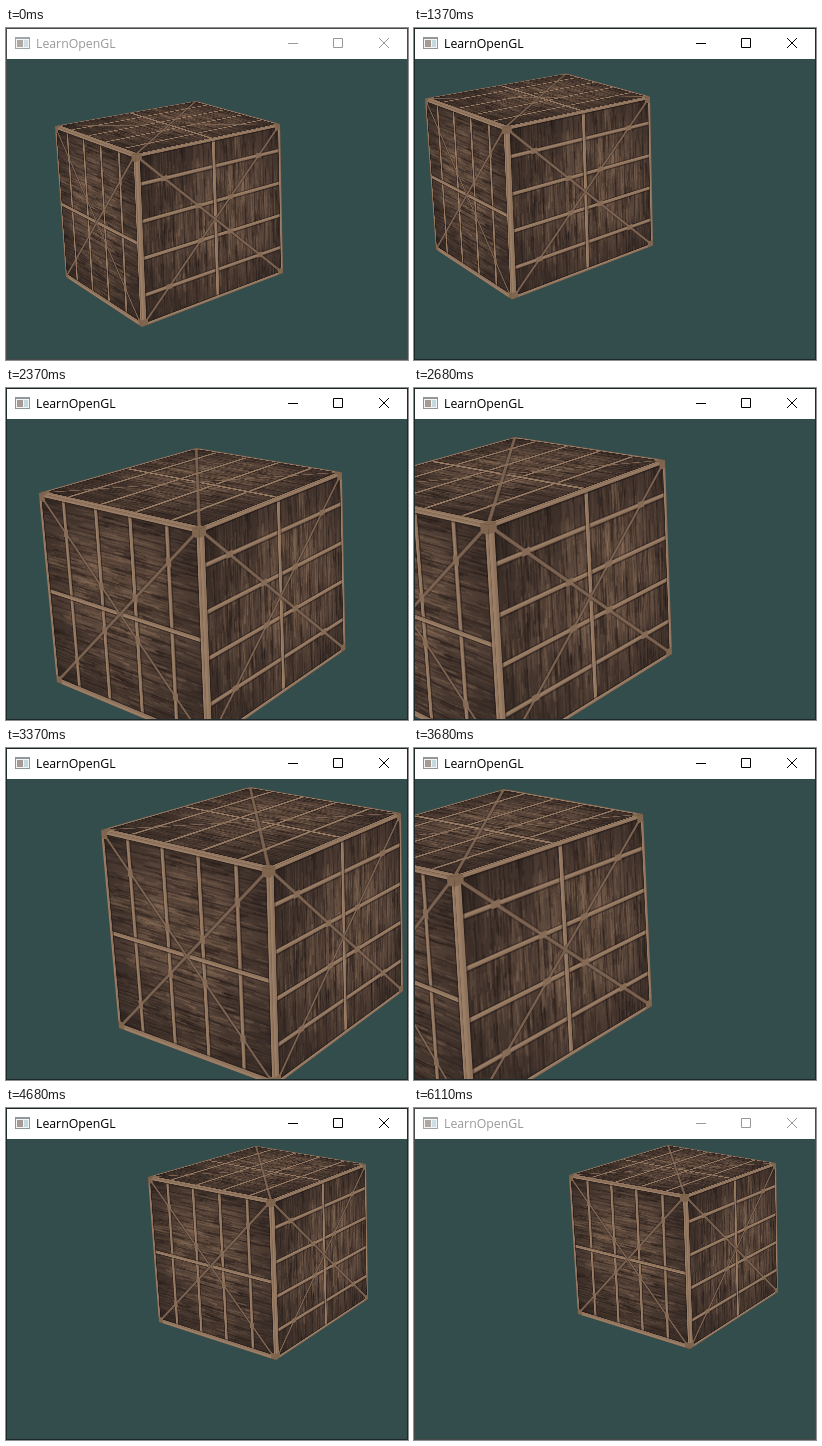
Write an HTML page with a canvas that moves like this. It is 402x332 px and loops after 6.17 s.

```html
<!DOCTYPE html>
<html lang="en">
<head>
<meta charset="utf-8">
<title>Textured cube</title>
<style>
  html, body { margin: 0; width: 100%; height: 100%; overflow: hidden; background: #fff; }
  #window { position: absolute; left: 0; top: 0; width: 402px; height: 332px; overflow: hidden; background: #fff; }
  #bar, #outline { position: absolute; left: 0; top: 0; }
  #view { position: absolute; left: 1px; top: 31px; width: 400px; height: 300px; overflow: hidden; background: #334c4c; }
  #view canvas { position: absolute; left: 0; top: 0; transform-origin: 0 0; }
</style>
</head>
<body>
<div id="window">
  <div id="view">
    <svg id="outline" width="400" height="300"><polygon id="hull" fill="#4a3a31"/></svg>
  </div>
  <svg id="bar" width="402" height="332">
    <g id="icon">
      <rect x="9" y="9" width="15" height="12" fill="#8f979b"/>
      <rect x="10" y="11" width="13" height="9" fill="#f4f4f4"/>
      <rect x="11" y="12" width="6" height="7" fill="#a39a93"/>
      <rect x="18" y="12" width="4" height="7" fill="#c3d9e2"/>
    </g>
    <text id="caption" x="30" y="20" font-family="'Open Sans', 'Noto Sans', sans-serif" font-size="12.3">LearnOpenGL</text>
    <path id="buttons" d="M282 15.5h10M327.5 10.5h9v9h-9zM373 10l10 10M383 10l-10 10" fill="none"/>
    <rect id="border" x=".5" y=".5" width="401" height="331" fill="none"/>
  </svg>
</div>
<script>
const LOOP = 6170, STEP = 76.67, SIZE = 256;
const $ = id => document.getElementById(id);

// Projected corners: far left, far, right, near (top face), then left, near, right (bottom).
const shapes = {
  start: [49,98, 190,73, 274,96, 129,127, 60,249, 136,299, 277,245],
  lower: [46,114, 182,87, 280,109, 139,143, 56,269, 146,319, 283,260],
  nearLeft: [-88,102, 101,49, 251,72, 74,137, -68,293, 88,372, 258,266],
  nearRight: [95,82, 244,39, 395,65, 263,121, 113,280, 269,338, 397,243],
  farLeft: [-104,97, 90,41, 229,66, 40,129, -84,291, 55,370, 238,258],
  away: [142,69, 250,38, 360,56, 265,93, 153,214, 270,252, 362,191],
  rest: [155,67, 254,37, 362,55, 271,88, 164,206, 276,241, 364,184]
};

function pose(name, dx = 0, dy = 0, scale = 1) {
  return shapes[name].map((v, i) => v * scale + (i % 2 ? dy : dx));
}

// [step, pose]; equal neighbours make a pause.
const keys = [
  [8, pose('start')],
  [12, pose('start', -30, -20)],
  [17, pose('start', -30, -20)],
  [21, pose('start', -62, -50)],
  [25, pose('lower', -25, -31)],
  [26, pose('lower')],
  [30, pose('nearRight', 6, 24, 0.95)],
  [33, pose('nearLeft', -6, 9)],
  [35, pose('nearLeft')],
  [39, pose('nearRight', -36, -4)],
  [42, pose('nearRight', -50, 0)],
  [44, pose('nearRight')],
  [48, pose('farLeft')],
  [51, pose('farLeft', 14, 2)],
  [55, pose('away', -103.8, -7, 1.21)],
  [57, pose('away', -103.8, -7, 1.21)],
  [61, pose('away')],
  [63, pose('rest')],
  [81, pose('rest')]
];

function cornersAt(t) {
  const step = Math.floor((t + 20) / STEP);
  if (step <= keys[0][0]) return keys[0][1];
  const next = keys.findIndex(k => k[0] >= step);
  const [s0, a] = keys[next - 1], [s1, b] = keys[next];
  const k = (step - s0) / (s1 - s0);
  return a.map((v, i) => v + (b[i] - v) * k);
}

function seeded(seed) {
  return () => (seed = (seed * 16807) % 2147483647) / 2147483647;
}

function drawCrate() {
  const canvas = document.createElement('canvas');
  canvas.width = canvas.height = SIZE;
  const c = canvas.getContext('2d'), rnd = seeded(77);
  const box = (color, x, y, w, h) => { c.fillStyle = color; c.fillRect(x, y, w, h); };

  const planks = 14, width = SIZE / planks;
  for (let i = 0; i < planks; i++) {
    const tone = 0.88 + rnd() * 0.24;
    box(`rgb(${86 * tone},${67 * tone},${56 * tone})`, i * width, 0, width + 1, SIZE);
  }
  // Wood grain: loose streaks, then worn and stained clusters
  const streak = (x, y, color, alpha) =>
    box(`rgba(${color},${alpha})`, x, y - 15, 0.6 + rnd() * 1.8, 6 + rnd() * 34);
  const dark = '32,24,22', light = '152,122,98';
  for (let i = 0; i < 1100; i++) {
    streak(rnd() * SIZE, rnd() * SIZE, rnd() < 0.5 ? dark : light, 0.1 + rnd() * 0.25);
  }
  for (let i = 0; i < 90; i++) {
    const x = rnd() * SIZE, y = rnd() * SIZE, color = rnd() < 0.45 ? dark : light;
    for (let j = 0; j < 10; j++) {
      streak(x + rnd() * 22, y + rnd() * 18, color, 0.15 + rnd() * 0.25);
    }
  }
  for (let i = 1; i < planks; i++) box('rgba(28,21,19,.5)', i * width, 0, 1.3, SIZE);

  const shade = c.createRadialGradient(128, 128, 60, 128, 128, 180);
  shade.addColorStop(0, 'rgba(30,23,22,0)');
  shade.addColorStop(1, 'rgba(30,23,22,.6)');
  c.fillStyle = shade;
  c.fillRect(0, 0, SIZE, SIZE);

  const beam = (x, y, w, h) => {
    box('rgba(28,21,20,.5)', x - 1.5, y - 1.5, w + 3, h + 3.5);
    box('#8f735c', x, y, w, h);
    box('rgba(190,160,130,.25)', x, y, w > h ? w : w / 2, w > h ? h / 2 : h);
  };
  const rails = [0.172, 0.388, 0.604, 0.82].map(v => v * SIZE);
  rails.forEach(y => beam(0, y - 2.5, SIZE, 5));
  beam(126, 0, 5, SIZE);

  const diagonals = (color, lineWidth) => {
    c.strokeStyle = color;
    c.lineWidth = lineWidth;
    c.beginPath();
    c.moveTo(0, 0); c.lineTo(SIZE, SIZE);
    c.moveTo(SIZE, 0); c.lineTo(0, SIZE);
    c.stroke();
  };
  diagonals('rgba(28,21,20,.5)', 5.5);
  diagonals('#7b6250', 3.6);
  rails.forEach(y => [y, SIZE - y].forEach(x => box('#866b56', x - 5, y - 4, 10, 8)));

  beam(0, 0, SIZE, 4);
  beam(0, SIZE - 4, SIZE, 4);
  beam(SIZE - 4, 0, 4, SIZE);
  beam(0, 0, 7, SIZE);
  [[0, 0], [SIZE - 10, 0], [0, SIZE - 10], [SIZE - 10, SIZE - 10]]
    .forEach(([x, y]) => box('#80664f', x, y, 10, 10));
  return canvas;
}

// Corner indices in the order of the texture's corners, from its top left.
const crate = drawCrate();
const faces = [[0, 1, 2, 3], [4, 0, 3, 5], [3, 2, 6, 5]].map(corners => {
  const canvas = document.createElement('canvas');
  canvas.width = canvas.height = SIZE;
  canvas.getContext('2d').drawImage(crate, 0, 0);
  $('view').append(canvas);
  return { canvas, corners };
});

function quadMatrix([[x0, y0], [x1, y1], [x2, y2], [x3, y3]]) {
  const ux = x1 - x2, uy = y1 - y2, vx = x3 - x2, vy = y3 - y2;
  const sx = x0 - x1 + x2 - x3, sy = y0 - y1 + y2 - y3;
  const det = ux * vy - vx * uy;
  const g = (sx * vy - vx * sy) / det, h = (ux * sy - sx * uy) / det;
  const scaled = [
    x1 - x0 + g * x1, y1 - y0 + g * y1, 0, g,
    x3 - x0 + h * x3, y3 - y0 + h * y3, 0, h
  ].map(v => (v / SIZE).toFixed(9));
  return `matrix3d(${[...scaled, 0, 0, 1, 0, x0, y0, 0, 1]})`;
}

function render(t) {
  const flat = cornersAt(t);
  const points = Array.from({ length: 7 }, (_, i) => [flat[2 * i] - 1, flat[2 * i + 1] - 31]);
  for (const { canvas, corners } of faces) {
    canvas.style.transform = quadMatrix(corners.map(i => points[i]));
  }
  $('hull').setAttribute('points', [0, 1, 2, 6, 5, 4].map(i => points[i]).join(' '));

  const active = t >= 670 && t < 5150;
  const ink = active ? '#000' : '#999';
  $('caption').setAttribute('fill', ink);
  $('buttons').setAttribute('stroke', ink);
  $('border').setAttribute('stroke', active ? '#20292a' : '#4a4a4a');
  $('icon').setAttribute('opacity', active ? 1 : 0.85);
}

const began = performance.now();
function tick() {
  render((performance.now() - began) % LOOP);
  requestAnimationFrame(tick);
}
tick();
</script>
</body>
</html>
```
